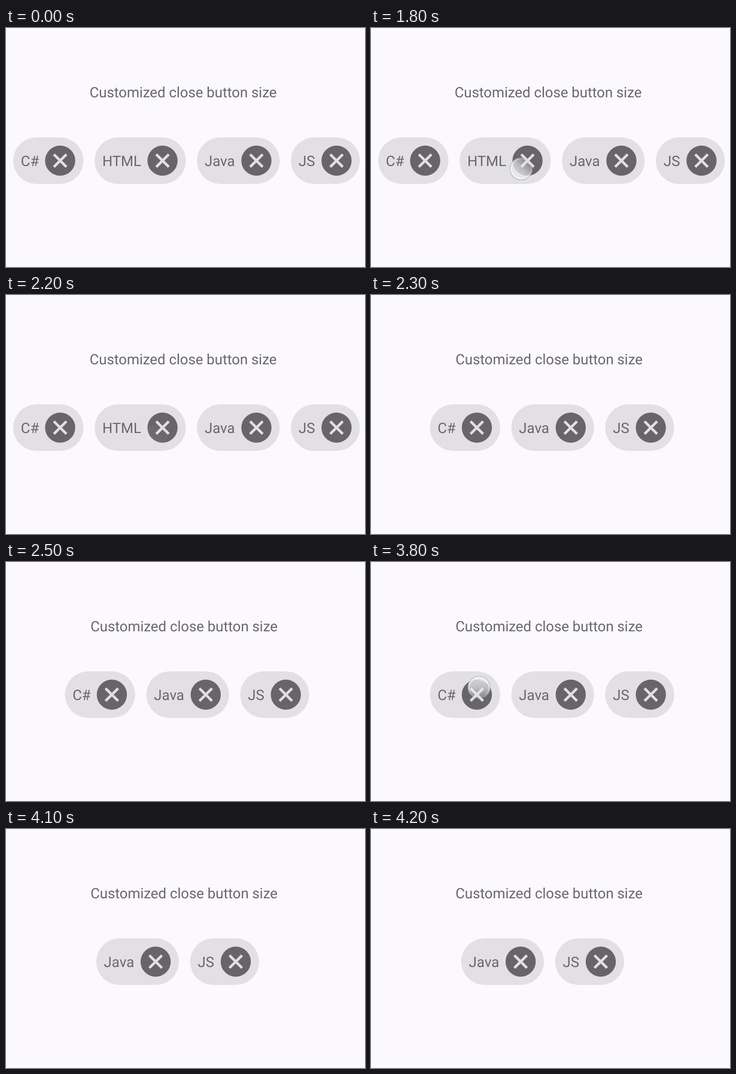
An HTML page that plays this animation: 600x400 px, repeating every 6300 ms.

```html
<!DOCTYPE html>
<html lang="en">
<head>
<meta charset="utf-8">
<title>Chips with close buttons</title>
<style>
  html, body { margin: 0; width: 100%; height: 100%; overflow: hidden; background: #fbf9fd; }
  svg { display: block; }
  text { font: 24px Roboto, Arial, sans-serif; fill: #69676b; text-rendering: geometricPrecision; }
  .chip rect { fill: #e2e0e3; }
  .chip circle { fill: #676569; }
  .chip path { stroke: #e2e0e3; stroke-width: 4.4; }
</style>
</head>
<body>
<svg id="stage" width="600" height="400" viewBox="0 0 600 400">
  <defs>
    <linearGradient id="glass" x2="0" y2="1">
      <stop offset="0" stop-color="#e9e8ec" stop-opacity=".88"/>
      <stop offset=".5" stop-color="#e9e8ec" stop-opacity=".68"/>
      <stop offset="1" stop-color="#e9e8ec" stop-opacity=".22"/>
    </linearGradient>
    <linearGradient id="rim" x2="0" y2="1">
      <stop offset="0" stop-color="#b9bace"/>
      <stop offset=".5" stop-color="#b9bace" stop-opacity=".8"/>
      <stop offset="1" stop-color="#b9bace" stop-opacity=".15"/>
    </linearGradient>
    <linearGradient id="shine" x2="0" y2="1">
      <stop offset="0" stop-color="#fff" stop-opacity=".9"/>
      <stop offset="1" stop-color="#fff" stop-opacity="0"/>
    </linearGradient>
  </defs>
  <text id="title" y="115.5" style="font-size:23.9px">Customized close button size</text>
  <g id="chips"></g>
  <g id="touch" fill="none">
    <circle r="18.3" fill="url(#glass)" stroke="url(#rim)" stroke-width="1.5"/>
    <circle r="16.6" stroke="url(#shine)" stroke-width="2"/>
  </g>
</svg>
<script>
const LOOP = 6300, STEP = 100, GAP = 18.6;
const byId = id => document.getElementById(id);

const chips = [['C#', 117.5], ['HTML', 152.5], ['Java', 138.3], ['JS', 115.3]].map(([label, width]) => {
  const node = document.createElementNS('http://www.w3.org/2000/svg', 'g');
  node.setAttribute('class', 'chip');
  node.innerHTML = `<rect width="${width}" height="78" rx="39"/>
    <text x="12.8" y="47.7">${label}</text>
    <g transform="translate(${width - 39} 39)">
      <circle r="25.2"/><path d="M-10.5-10.5 10.5 10.5M10.5-10.5-10.5 10.5"/>
    </g>`;
  byId('chips').append(node);
  return { label, width, node };
});

const layouts = [
  { from: 0, left: 12, title: 139.7, labels: ['C#', 'HTML', 'Java', 'JS'] },
  { from: 2300, left: 98.4, title: 141.2, labels: ['C#', 'Java', 'JS'] },
  { from: 3900, left: 150.8, title: 141.2, labels: ['Java', 'JS'] }
];

// Each tap holds briefly, then fades in 100 ms steps.
const taps = [
  { from: 1800, x: 251, y: 235.7, turn: 225, fade: [1, 1, .75, .4, .06] },
  { from: 3800, x: 180.6, y: 210, turn: 0, fade: [1, .8, .4, .08] }
];

function draw(time) {
  const layout = layouts.findLast(l => time >= l.from);
  byId('title').setAttribute('x', layout.title);
  let x = layout.left;
  for (const { label, width, node } of chips) {
    const shown = layout.labels.includes(label);
    node.style.display = shown ? '' : 'none';
    if (!shown) continue;
    node.setAttribute('transform', `translate(${x} 183)`);
    x += width + GAP;
  }

  const tap = taps.findLast(t => time >= t.from) || taps[0];
  const touch = byId('touch');
  touch.setAttribute('transform', `translate(${tap.x} ${tap.y}) rotate(${tap.turn})`);
  touch.setAttribute('opacity', tap.fade[Math.floor((time - tap.from) / STEP)] || 0);
}

function tick() {
  draw(performance.now() % LOOP);
  requestAnimationFrame(tick);
}
tick();
</script>
</body>
</html>
```
